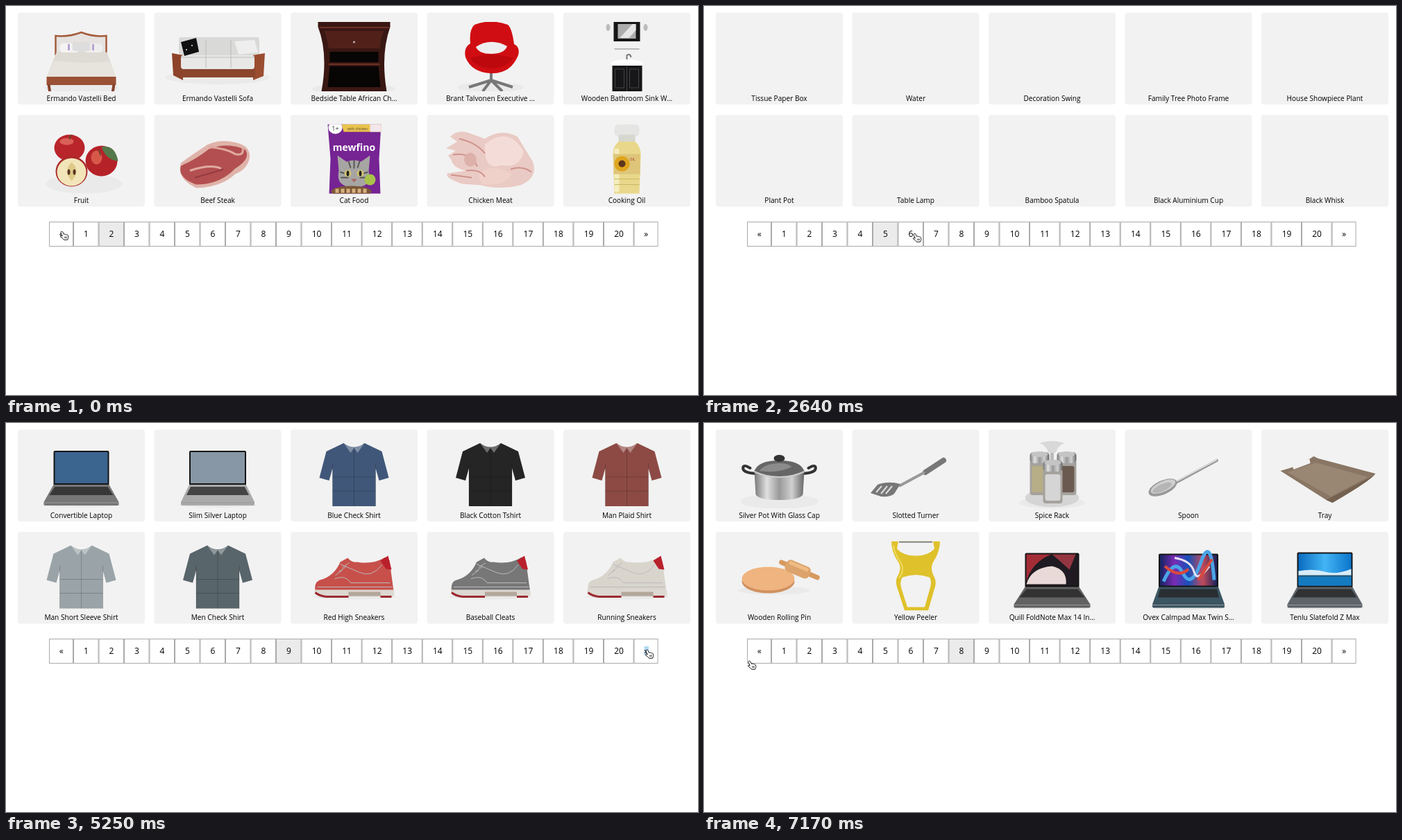
Animation of 997 by 561 pixels, one loop 7200 ms. Source, as an HTML page:

```html
<!DOCTYPE html>
<html lang="en">
<head>
<meta charset="utf-8">
<title>Product pages</title>
<style>
html, body { margin: 0; width: 100%; height: 100%; overflow: hidden; background: #fff; }
svg { display: block; }
text { font-family: "Open Sans", "Noto Sans", sans-serif; text-anchor: middle; }
.title { font-size: 10.1px; font-weight: 500; }
.nav { font-size: 12px; font-weight: 500; }
</style>
</head>
<body>
<svg id="stage" width="997" height="561" viewBox="0 0 997 561">
  <defs id="defs"></defs>
  <g id="cards"></g>
  <g id="items"></g>
  <g id="pager"></g>
  <path id="hand" fill="#fff" stroke="#111" d="M-4.6-5.4c1-.9 2-.4 2.5.6l1.6 3.2c.8-.7 1.7-.5 2.1.2.8-.5 1.6-.2 2 .5.9-.3 1.5.2 1.8 1 .6 1.8.6 3-.2 4.6L4.6 6.2H-.5C-1.7 4.3-3.5 3.2-5.3 2c-.8-.9 0-1.9 1.2-1.6l1.3.6-2-4.6c-.3-.7-.2-1.3.2-1.8zM1 1.5v2.5M3 1.5v2.5"/>
</svg>
<script>
const $ = id => document.getElementById(id);

// Shape helpers; pictures use x from the card centre and y from 0 to 100
const P = (d, fill, more = '') => `<path d="${d}" fill="${fill}" ${more}/>`;
const L = (d, color, w = 1, more = '') => P(d, 'none', `stroke="${color}" stroke-width="${w}" ${more}`);
const R = (x, y, w, h, fill, r = 0, more = '') => `<rect x="${x}" y="${y}" width="${w}" height="${h}" rx="${r}" fill="${fill}" ${more}/>`;
const E = (x, y, rx, ry, fill, more = '') => `<ellipse cx="${x}" cy="${y}" rx="${rx}" ry="${ry}" fill="${fill}" ${more}/>`;
const T = (x, y, size, fill, s, more = '') => `<text x="${x}" y="${y}" font-size="${size}" fill="${fill}" ${more}>${s}</text>`;
const turn = (a, x, y, s) => `<g transform="rotate(${a} ${x} ${y})">${s}</g>`;
const shadow = (x, y, rx, ry) => E(x, y, rx, ry, '#eaeaea');
const grad = (id, ...colors) => `<linearGradient id="${id}">` +
  colors.map((c, i) => `<stop offset="${i / (colors.length - 1)}" stop-color="${c}"/>`).join('') + '</linearGradient>';
const ROUND = 'stroke-linecap="round"';

$('defs').innerHTML = grad('steel', '#777', '#e0e0e0', '#999', '#d0d0d0', '#666') +
  grad('gold', '#8a6030', '#f0d5a0', '#b5884e', '#7a5028') +
  grad('frost', '#bdbdbd', '#eee', '#fafafa', '#ddd', '#b5b5b5') +
  grad('pearl', '#dcdcdc', '#f3f3f3', '#eaeaea', '#d4d4d4') +
  grad('amber', '#c9923e', '#f8dc9a', '#efbd68', '#fae7b8', '#c48a38') +
  grad('cloth', '#7c7f82', '#a0a2a4', '#939598', '#808284') +
  grad('sky', '#0a6cc0', '#43b5f5', '#0b75cc') +
  grad('neon', '#12235f', '#7a2bb5', '#1650b9', '#c04a5c', '#17225c');

// Strap with lugs, crown, case, dial, hour marks and two hands
function watch(x, r, strap, rim, dial, mark, more = '') {
  const w = r * .56, lug = r * .68;
  return P(`M${x - w + 2} 0H${x + w - 2}L${x + w} 50L${x + w - 2} 100H${x - w + 2}L${x - w} 50z`, strap) +
    L(`M${x} 0V100`, '#0003', 2 * w - 4, 'stroke-dasharray="1 4"') +
    L(`M${x - lug} ${50 - r}V${50 + r}M${x + lug} ${50 - r}V${50 + r}`, rim, 4, ROUND) +
    R(x + r - 2, 47, 5, 6, rim, 1) + E(x, 50, r, r, rim) + E(x, 50, r - 3, r - 3, dial, 'stroke="#0006"') +
    E(x, 50, r - 7, r - 7, 'none', `stroke="${mark}" stroke-width="4" pathLength="12" stroke-dasharray=".1 .9" stroke-dashoffset=".05"`) +
    more + L(`M${x} 50l${-r * .45} ${-r * .25}M${x} 50l${r * .6} ${-r * .3}`, mark, 1.2);
}
const subdial = (x, y, c) => E(x, y, 5, 5, 'none', `stroke="${c}"`);

function laptop(w, b, y, screen, deck, more = '') {
  return shadow(0, 95, b + 3, 4) + R(-w, y, 2 * w, 67 - y, '#151515', 2) + R(-w + 2, y + 2, 2 * w - 4, 62 - y, screen) +
    more + P(`M${-w} 66H${w}L${b} 91v3q0 2-3 2H${-b + 3}q-3 0-3-2v-3z`, deck) +
    P(`M${-w + 2} 69H${w - 2}L${b - 8} 81H${-b + 8}z`, '#222', 'opacity=".75"') + L(`M${-b} 92H${b}`, '#999');
}

const shoe = (c, more = '') => shadow(0, 80, 60, 4) +
  P('M-56 72C-57 62-55 57-46 55Q-28 49-20 30L-9 24Q-4 31 4 30Q28 34 45 23L51 28L57 72z', c) +
  L('M-20 33L8 45Q26 53 40 34M-28 54Q-12 48-5 60L52 60M-53 66H55M-17 38l10-7M-22 44l10-7M-27 49l10-7', '#bbb') +
  P('M38 28L49 21L54 41L46 40z', '#b9202c') + P('M-57 70H57l1 6q-1 4-5 4H-46q-10-2-11-7z', '#ddd8d2') +
  R(-8, 73, 46, 6, '#b3a69a') + L('M-56 74Q-50 79-40 80H-8M38 80H54', '#9c2a30', 3) + more;

const frontShoe = x => P(`M${x - 16} 27Q${x} 12 ${x + 16} 27L${x + 21} 84Q${x + 18} 95 ${x} 95T${x - 21} 84z`, '#e6e4e0') +
  P(`M${x - 15} 29Q${x} 8 ${x + 15} 29Q${x} 19 ${x - 15} 29`, '#c12a35') +
  L(`M${x - 9} 35h18M${x - 10} 42h20M${x - 10} 49h20M${x - 11} 56h22M${x - 17} 74Q${x} 56 ${x + 17} 74`, '#b5b2ae', 1.5) +
  L(`M${x - 20} 86Q${x - 16} 95 ${x} 95T${x + 20} 86`, '#a33', 2.5);

const shirt = c => P('M-15 6L-40 18L-50 56L-36 60L-31 42V97H31V42L36 60L50 56L40 18L15 6Q0 17-15 6z', c) +
  L('M0 13V97M-31 35V97M31 35V97M-31 55H31M-31 75H31', '#0003') + P('M-15 6L-5 20L0 13L5 20L15 6Q0 13-15 6', '#fff5');

const jar = (x, y, fill) => R(x - 14, y + 12, 28, 50, '#a5a29d', 4) + R(x - 11, y + 20, 22, 38, fill, 3) +
  R(x - 14, y, 28, 16, 'url(#steel)', 5) + E(x, y + 3, 12, 4, '#c4c4c4');

function palette() {
  const tones = ['#9b4a38', '#d8a173', '#5b2b27', '#c96b4c', '#7b322c', '#e1bd96'];
  let s = P('M-7 14L64 16L59 85L-9 63z', '#2a2727') + P('M-4 17L60 19L56 79L-6 60z', '#cfd4d4') +
    P('M15 18L40 18L5 61L-5 60z', '#eee') + P('M-56 84L-9 63L59 84L5 100H-10z', '#2a2020');
  for (let i = 0; i < 15; i++) {
    const a = i % 5, b = i / 5 | 0;
    s += E(-10 + a * 13 - b * 15, 69 + a * 4 + b * 6, 6, 3.2, tones[(i * 5 + b) % 6]);
  }
  return s;
}

const art = {
  1: [
    R(-29, 6, 17, 34, '#171b1a', 4) + R(-34, 37, 22, 65, '#14231e', 5) +
      T(-23, 60, 13, '#85cdb3', 'Lash', 'font-style="italic" transform="rotate(-12 -23 60)"') + R(-32, 74, 18, 15, '#75a894', 4) +
      T(-23, 84, 5, '#123', 'VOLUME') + L('M22 0V18', '#222', 7, 'stroke-dasharray="1.4 .8"') + L('M22 18V70', '#222', 2) +
      P('M16 68h12l5 32H11z', '#111') + L('M22 82l5 6-5 6-5-6z', '#9fd5bd', 2),
    palette(),
    shadow(1, 88, 42, 10) + E(-1, 43, 33, 23, '#292929') + E(-1, 42, 28, 18, '#5b5652') + E(-1, 44, 25, 15, '#413c3a') +
      R(-11, 61, 22, 9, '#333', 2) + E(1, 79, 36, 15, '#222') + E(1, 75, 35, 12, '#555') + E(1, 75, 29, 9, '#d9c3b4'),
    P('M-32 100V62Q-30 43-18 43T-4 62V100z', '#202020') + L('M-25 62V98', '#555', 4) +
      P('M10 25V0H25L27 25z', '#cf1726') + R(7, 23, 23, 43, 'url(#gold)') + R(4, 65, 28, 35, '#1c1919', 2) + L('M10 68V98', '#555', 3),
    shadow(0, 93, 46, 8) + turn(-25, 18, 73, R(2, 49, 30, 32, '#c9172a', 8) + R(6, 73, 22, 33, '#302e2f', 4)) +
      P('M-27 48L-24 8H-11L-8 48z', '#282628') + R(-34, 50, 34, 45, '#b91528', 7) + R(-30, 53, 6, 37, '#e66a72', 3) + R(-27, 47, 19, 7, '#8b1120'),
    R(-77, 0, 40, 100, '#000') + R(37, 0, 40, 100, '#000') + R(-20, 0, 40, 7, '#d8d8d8') +
      P('M-27 0H27Q32 12 32 24V100H-31V24Q-32 12-27 0z', 'url(#frost)') + T(0, 57, 38, '#888', 'ov', 'font-weight="300"') + T(0, 66, 5, '#999', 'duo'),
    R(-14, 0, 28, 13, '#151515', 2) + R(-11, 12, 22, 8, '#333') + R(-40, 19, 81, 82, '#090909', 5) +
      R(-18, 38, 37, 43, '#111', 0, 'stroke="#b89b68" stroke-width="1.5"') + T(0, 51, 8, '#eee', 'LUNE') + T(0, 58, 5, '#ddd', 'NUIT') +
      T(0, 69, 7, '#eee', 'VARELLE', 'font-weight="700"') + T(0, 76, 4, '#ddd', 'PARIS'),
    P('M-5 0H5L7 25Q9 43 19 57Q26 75 23 100H-24Q-26 73-18 57Q-8 42-6 25z', 'url(#amber)') +
      L('M-6 9H6M-6 15H6M-6 21H6M-7 28H7M-8 34H8', '#a56c28', 1.5) + L('M-15 64Q0 53 15 64', '#fff6', 5),
    R(-78, 0, 14, 100, '#000') + R(63, 0, 14, 100, '#000') + P('M-24 3Q0-5 23 3L13 14V23H-13V14z', '#e7bd2b') +
      P('M-22 37Q-30 40-29 52L-26 95Q0 107 26 95L29 52Q30 40 22 37z', '#f1e995') + R(-22, 42, 43, 47, '#f7f2b9', 9) +
      P('M-22 24L0 29L21 22V35L3 31L6 41L0 33L-9 41L-5 31L-20 34z', '#161616') + T(0, 68, 15, '#555', 'Solea', 'font-style="italic"') +
      T(0, 75, 4, '#777', 'EAU DE PARFUM') + T(0, 87, 5, '#777', 'glint'),
    R(-15, 0, 30, 15, '#e4b9ab') + R(-38, 13, 76, 88, '#efc9bd', 2) + R(-34, 18, 68, 83, '#f2d5ca') +
      R(-29, 32, 58, 76, '#f1e4dc', 0, 'stroke="#111" stroke-width="4"') + T(0, 67, 9, '#333', 'VENRO', 'letter-spacing="1"') + T(0, 73, 5, '#555', 'PETAL'),
  ],
  2: [
    shadow(0, 95, 54, 7) + P('M-37 45V20Q-18 21 0 14Q18 21 36 20V45z', '#e5e2df') + L('M-37 48V20Q-19 22 0 15Q18 22 36 20V48', '#a45d3d', 2.5) +
      P('M-36 44Q0 36 37 44L50 80H-50z', '#dedbd4') + P('M-39 56Q0 61 42 57L50 80H-50z', '#e7e4dd') +
      R(-31, 31, 28, 13, '#f4f3f3', 5) + R(3, 31, 28, 13, '#eee', 5) + R(-13, 29, 26, 13, '#ddd', 4) + L('M-18 32v9M17 32v9', '#b8a3cf', 3) +
      P('M-50 79H50V91H-50z', '#9a5135') + L('M-47 90l2 13M47 90l-2 13', '#87422b', 4),
    shadow(0, 80, 75, 10) + R(-56, 22, 116, 42, '#d9d9d8', 4) + P('M-66 45L-50 48V84L-64 77z', '#8d432a') + P('M68 45L51 48V84L66 78z', '#9b4d30') +
      R(-52, 68, 106, 12, '#8b452d') + R(-53, 48, 106, 20, '#e8e8e7', 4) + L('M-17 26V66M19 26V66M-53 51H53', '#bbb') +
      P('M-53 29L-31 23L-27 43L-48 49z', '#111') + E(-37, 34, 1, 1, '#eee') + E(-45, 40, 1, 1, '#eee') + P('M24 28L53 26L58 44L30 47z', '#eee'),
    shadow(0, 97, 60, 9) + P('M-52 0H52V7Q38 47 47 100H-47Q-37 46-52 7z', '#391713') + P('M-43 13H43Q38 25 37 38H-37Q-38 25-43 13z', '#512119') +
      P('M-35 43H35V58H-35zM-35 64H35L38 94H-38z', '#080505') + L('M-50 8H50M-37 61H37', '#6e3026', 2) + E(0, 29, 1.5, 1.5, '#bbb'),
    shadow(0, 94, 48, 7) + L('M1 70V85M1 84L-31 94M1 84L-11 100M1 84L32 94M1 84L17 100', '#777', 4) +
      P('M-23 4Q0-5 25 4Q31 9 34 32Q43 36 40 48Q29 75 1 74Q-27 73-36 51Q-39 37-29 31Q-31 11-23 4z', '#d00d12') +
      P('M-21 36Q0 22 24 35Q20 46 1 46Q-17 46-21 36z', '#eee') + P('M-29 52Q0 42 33 52Q20 68 1 67Q-20 67-29 52z', '#bd090e'),
    R(-19, 0, 38, 28, '#171717') + R(-13, 3, 26, 21, '#adadad') + P('M-10 23L8 3H13V12L3 23z', '#e5e5e5') +
      E(-27, 8, 3, 5, '#bbb') + E(27, 8, 3, 5, '#bbb') + L('M-18 39H18', '#bbb', 2) + L('M0 57V48Q5 45 6 51', '#777', 2) +
      E(0, 60, 23, 6, '#fff') + R(-21, 63, 43, 37, '#171719') + L('M0 65V100M-17 68H-4V95H-17zM4 68H17V95H4z', '#444'),
    shadow(4, 86, 55, 14) + E(-17, 34, 22, 19, '#b9252b') + E(-21, 25, 10, 5, '#db6057') + E(29, 53, 23, 22, '#b52228') + E(22, 48, 8, 10, '#d75849') +
      P('M29 33Q48 28 53 53Q36 52 29 33', '#55784a') + L('M-17 22Q-17 16-13 16M28 45L25 37', '#69452c', 2) +
      E(-14, 68, 23, 22, '#a92a2a') + E(-14, 69, 21, 20, '#f2e5b9') + P('M-14 55Q0 66-14 82Q-27 67-14 55', '#dfc989') + E(-18, 69, 2, 4, '#59341e') + E(-10, 69, 2, 4, '#59341e'),
    P('M-53 56Q-40 46-20 33Q-5 22 19 25Q48 29 46 48Q43 65 25 72Q5 91-31 92Q-60 78-53 56z', '#dfb3a9') +
      P('M-53 60Q-30 50-13 36Q15 25 40 37Q48 50 25 64Q3 87-31 87Q-58 77-53 60z', '#b34f50') +
      L('M-13 33Q13 35 25 43Q38 46 36 35M-40 67Q-10 57 5 64', '#e0aaa0', 3) + L('M-33 77Q-8 70 8 65', '#943a42', 2),
    P('M-38 0H39L36 50L38 101H-36L-34 50z', '#762394') + P('M-18 0H39V11H-15z', '#e9c34d') + R(23, 0, 16, 11, '#f3e6ed') + E(-27, 5, 10, 9, '#fff') +
      T(-27, 9, 9, '#333', '1+') + T(5, 8, 5, '#543', 'with chicken') + T(0, 38, 14, '#fff', 'mewfino', 'font-weight="700"') +
      P('M-22 67L-24 45L-11 54Q0 50 10 54L23 45L21 68Q27 91 0 91Q-27 91-22 67z', '#a6a5a3') +
      L('M-8 53l3 10M0 52v12M8 53l-3 10M-20 69l10 3M20 69l-10 3M-19 77l11 0M19 77l-11 0', '#565656', 2) +
      E(-9, 71, 5, 5, '#d4c570') + E(9, 71, 5, 5, '#d4c570') + E(-9, 71, 2, 4, '#222') + E(9, 71, 2, 4, '#222') + P('M-4 79h8l-4 5z', '#a96762') +
      E(23, 80, 8, 8, '#a9c24a') + E(-4, 97, 29, 8, '#795637') + L('M-27 96H20', '#d7b07e', 6, 'stroke-dasharray="5 3"'),
    P('M-58 18Q-48 8-33 12L-8 21Q15 5 39 18Q50 36 61 54Q69 77 43 88Q13 95-13 88L-41 86Q-67 77-62 71L-35 67Q-54 63-56 52L-61 45L-50 38L-64 35L-48 25z', '#eacac4') +
      P('M-8 29Q25 2 48 39Q42 65 15 59Q-10 68-8 29z', '#f4ddd8') + P('M-17 73Q2 54 30 72Q20 91-13 86z', '#f0d1c9') +
      L('M-45 21Q-21 26-8 42M-54 44Q-28 40-19 61M-35 67Q-15 64-8 76M29 65Q46 59 59 69M-57 73L-27 77', '#cf938d', 2) + E(-29, 51, 9, 10, '#ddb1aa'),
    R(-18, 0, 36, 18, '#e5e5e4', 7) + R(-12, 15, 24, 13, '#d6d7cf', 3) + P('M-12 25H12Q21 33 20 47L18 101H-18L-20 47Q-21 33-12 25z', '#e9d88b') +
      R(-18, 35, 7, 63, '#f5edbc', 3) + R(-19, 43, 38, 29, '#dec579') + E(-7, 57, 11, 11, '#dfa51d') + E(-7, 57, 5, 5, '#5c371b') +
      T(8, 52, 5, '#a33', 'OIL') + L('M-18 79H18M-18 87H18', '#c9b85f'),
  ],
  8: [
    shadow(0, 90, 56, 11) + L('M-34 50L-42 49Q-54 47-52 40Q-50 37-42 42M34 50L42 49Q54 47 52 40Q50 37 42 42', '#333', 4, ROUND) +
      P('M-36 46H36L34 80Q30 88 0 88Q-30 88-34 80z', 'url(#steel)') +
      P('M-36 46Q-30 31 0 31Q30 31 36 46Q20 54 0 54T-36 46z', '#666') + P('M-29 46Q-20 35 0 35Q12 35 18 40Q0 50-29 46z', '#8b8b8b') +
      E(0, 28, 8, 5, '#333') + L('M-36 47Q-20 55 0 55T36 47', '#ccc', 2),
    L('M40 31L14 48', '#777', 8, ROUND) + L('M13 48L-24 68', '#999', 4) +
      P('M-65 78L-55 66Q-40 60-22 65L-31 79Q-36 84-50 83z', '#777') + L('M-57 77l8-9M-50 79l9-11M-43 79l9-11', '#ddd', 2),
    shadow(0, 92, 48, 8) + E(0, 85, 39, 13, '#d5d5d5') + L('M0 10V85', '#bbb', 5) + P('M-18 6Q0 0 18 6Q9 9 5 20H-5Q-9 9-18 6z', '#d8d8d8') +
      jar(-18, 19, '#b7ad86') + jar(21, 19, '#6b5a50') + jar(1, 31, '#d5d5d5'),
    L('M41 31L-20 64', '#999', 4, ROUND) + L('M41 30L-19 62', '#ddd', 1.5) +
      turn(-24, -37, 70, E(-37, 70, 22, 10, '#999') + E(-36, 69, 19, 7.5, '#cfcfcf') + E(-38, 70, 15, 5, '#b5b5b5')),
    P('M-64 46Q-36 39-16 25L-10 28L73 50Q66 60 11 92L2 88z', '#8a7664') + P('M-54 48L-13 34L62 55L9 83z', '#9a8773') +
      P('M2 88L70 53L73 50Q66 60 11 92z', '#75614f') + P('M-47 39L-22 29L-21 35L-45 44z', '#f2f2f2'),
    shadow(-8, 71, 52, 6) + E(-16, 58, 38, 17, '#d09160') + E(-16, 54, 38, 17, '#efb47f') +
      turn(23, 28, 41, L('M1 41H57', '#d79a60', 7, ROUND) + R(8, 32, 37, 18, '#dca46c', 6) + R(11, 34, 30, 5, '#efbc86', 2)),
    P('M-35 0H35Q35 14 27 27Q19 38 27 52Q31 60 26 72L18 100H-16L-25 72Q-30 60-27 52Q-18 38-27 27Q-35 14-35 0z', '#dfc12b') +
      P('M-25 0H25L27 11Q18 21 0 21T-27 11zM-19 52Q0 45 20 52Q24 58 20 70L13 95H-12L-20 70Q-24 58-19 52z', '#f2f2f2') + R(-24, 0, 48, 2, '#777') +
      L('M-32 6Q-31 16-24 27Q-14 40-24 53', '#efd95c', 2),
    laptop(39, 55, 17, '#201b22', '#626262', P('M-37 62Q-30 38 0 36Q22 41 20 62z', '#e9dad8') + P('M-37 19H-1Q-29 30-37 58z', '#a32c36') + P('M0 19H34L25 41Q12 29 0 19z', '#943641')),
    laptop(43, 52, 18, 'url(#neon)', '#3c5563', L('M-36 58Q-20 22-8 46T18 30T37 56', '#4aa5e8', 5) + L('M-20 24Q4 28 8 44T30 36', '#e5e0f2', 3) + L('M-34 36Q-14 54 0 40M14 56L34 26', '#d9493c', 4)),
    laptop(40, 54, 16, 'url(#sky)', '#5d646a', P('M-38 43Q-16 39 0 44T38 40V50H-38z', '#d8edf9') + P('M-38 50H38V64H-38z', '#147bc1') + L('M-38 50H38', '#27516d', 2)),
  ],
  9: [
    laptop(40, 54, 17, '#3b648f', '#777'), laptop(41, 53, 17, '#8797a5', '#aaa'), shirt('#405779'), shirt('#252525'), shirt('#8d4a44'),
    shirt('#9aa4a8'), shirt('#58656b'), shoe('#c7504b'), shoe('#777'), shoe('#d9d5cd'),
  ],
  10: [
    shoe('#e7e6e2', E(8, 55, 11, 11, '#bd2029')),
    shadow(0, 93, 50, 8) + frontShoe(-22) + frontShoe(25),
    watch(3, 27, '#5d4035', '#c0974f', '#e8e6e0', '#444', subdial(-8, 50, '#777') + subdial(3, 39, '#777') + subdial(14, 50, '#777') + E(3, 62, 6, 5, '#324f87')),
    watch(-1, 28, 'url(#steel)', '#999', '#202225', '#ccc', subdial(-11, 50, '#999') + subdial(-1, 38, '#999') + subdial(-1, 62, '#999')),
    watch(2, 32, '#262626', '#a8765f', '#2c2a29', '#a58777', E(12, 50, 8, 8, '#151515', 'stroke="#777"')),
    watch(0, 32, '#30231f', '#a87f6e', '#e6e6e6', '#86736b', E(-3, 66, 8, 8, '#263e98') + E(-6, 67, 3, 3, '#7185bb')),
    watch(0, 28, 'url(#steel)', 'url(#gold)', '#4b443e', '#c1a779', R(8, 46, 7, 7, '#ddd') + L('M0 0V22M0 78V100', '#b58a48', 11, 'stroke-dasharray="4 1"')),
    watch(-1, 33, 'url(#steel)', '#292a2c', '#121315', '#ddd', E(-1, 50, 30, 30, 'none', 'stroke="#777" stroke-width="2" stroke-dasharray="1 4"') + R(8, 46, 9, 7, '#eee') + L('M-1 0V17M-1 83V100', '#b48a48', 13, 'stroke-dasharray="4 1"')),
    shadow(0, 97, 50, 6) + P('M-37 4Q0-4 37 4L34 101H-37z', 'url(#cloth)') + E(0, 5, 37, 5, '#202426') + L('M-35 6Q0 13 35 6', '#5fa5d6', 2),
    shadow(4, 94, 54, 7) + E(-16, 25, 29, 25, '#dadada', 'transform="rotate(32 -16 25)"') + E(19, 24, 29, 24, '#dedede', 'transform="rotate(-32 19 24)"') +
      R(-46, 46, 93, 55, 'url(#pearl)', 15) + E(0, 51, 41, 5, '#cfcfcf') + P('M-14 34L-3 50H-13L-27 39zM17 34L7 50H17L30 39z', '#e6e6e6') +
      E(-17, 33, 15, 12, '#f5f5f5') + E(20, 33, 15, 12, '#f5f5f5') + turn(30, -17, 34, E(-17, 34, 6, 4, '#444')) + turn(-30, 18, 34, E(18, 34, 6, 4, '#444')) + E(0, 65, 1, 1, '#da6'),
  ],
};

const titles = [,
  "Lustera Mascara Lash Pri…|Eyeshadow Palette with M…|Powder Canister|Red Lipstick|Red Nail Polish|Orvin Vessel OV Duo|Varelle Lune Nuit Eau De|Faen T'espère|Solea Glint Eau de|Venro Petal Eau de",
  'Ermando Vastelli Bed|Ermando Vastelli Sofa|Bedside Table African Ch…|Brant Talvonen Executive …|Wooden Bathroom Sink W…|Fruit|Beef Steak|Cat Food|Chicken Meat|Cooking Oil',
  'Cucumber|Dog Food|Eggs|Fish Steak|Green Bell Pepper|Green Chili Pepper|Honey Jar|Ice Cream|Juice|Kiwi',
  'Lemon|Milk|Mulberry|Instant Coffee|Potatoes|Protein Powder|Red Onions|Rice|Soft Drinks|Strawberry',
  'Tissue Paper Box|Water|Decoration Swing|Family Tree Photo Frame|House Showpiece Plant|Plant Pot|Table Lamp|Bamboo Spatula|Black Aluminium Cup|Black Whisk',
  'Boxed Blender|Carbon Steel Wok|Chopping Board|Citrus Squeezer Yellow|Egg Slicer|Electric Stove|Fine Mesh Strainer|Fork|Glass|Grater Black',
  'Hand Blender|Ice Cube Tray|Kitchen Sieve|Knife|Lunch Box|Microwave Oven|Mug Tree Stand|Pan|Plate|Red Tongs',
  'Silver Pot With Glass Cap|Slotted Turner|Spice Rack|Spoon|Tray|Wooden Rolling Pin|Yellow Peeler|Quill FoldNote Max 14 In…|Ovex Calmpad Max Twin S…|Tenlu Slatefold Z Max',
  'Convertible Laptop|Slim Silver Laptop|Blue Check Shirt|Black Cotton Tshirt|Man Plaid Shirt|Man Short Sleeve Shirt|Men Check Shirt|Red High Sneakers|Baseball Cleats|Running Sneakers',
  'Sports Sneakers Pale Grey…|Sports Sneakers Pale Grey…|Brown Leather Belt Watch|Corvanne Prime Collection|Velmo Tarsino Date Black D…|Velmo Tarsino Moonphase|Velmo Dayfine|Velmo Tidehunter Watch|Nilora Murmur Max|Quill Earbeads',
].map(s => s.split('|'));

// time, highlighted page, listed page, time the pictures start to arrive
const NONE = Infinity;
const states = [
  [0, 2, 2, -999], [120, 1, 2, -999], [240, 1, 1, 360],
  [1080, 2, 1, 360], [1170, 2, 2, 1230], [1590, 3, 2, 1230], [1680, 3, 3, NONE],
  [2100, 4, 3, NONE], [2190, 4, 4, NONE], [2460, 5, 4, NONE], [2550, 5, 5, NONE],
  [2760, 6, 5, NONE], [2850, 6, 6, NONE], [3120, 7, 6, NONE], [3210, 7, 7, NONE],
  [3480, 8, 7, NONE], [3570, 8, 8, NONE], [4170, 9, 8, NONE], [4260, 9, 9, 4530],
  [5310, 10, 9, 4530], [5400, 10, 10, 5490], [6600, 9, 10, 5490], [6660, 9, 9, NONE],
  [6810, 8, 9, NONE], [6870, 8, 8, 6900],
];
// time, x, y of the pointer
const moves = [
  [0, 84, 331], [840, 84, 331], [1050, 155, 331], [1350, 155, 331], [1560, 198, 331], [1860, 198, 331],
  [2070, 232, 332], [2280, 232, 332], [2430, 268, 333], [2640, 307, 334], [2820, 307, 334], [3060, 340, 333],
  [3240, 340, 333], [3420, 376, 333], [3660, 376, 333], [4080, 927, 333], [5845, 927, 333], [6400, 88, 331],
  [6500, 74, 365], [6600, 82, 333], [6840, 82, 333], [7140, 69, 349], [7200, 69, 349],
];

const place = i => [17 + i % 5 * 196.5, i < 5 ? 9.5 : 157];
$('cards').innerHTML = titles[1].map((_, i) => R(...place(i), 183, 132.5, '#f2f2f2', 4)).join('');

function drawItems(page, count) {
  $('items').innerHTML = titles[page].map((name, i) => {
    const [x, y] = place(i);
    const picture = i < count && art[page] ? `<svg x="${x}" y="${y + 13.5}" width="183" height="100" viewBox="-91.5 0 183 100">${art[page][i]}</svg>` : '';
    return picture + `<text class="title" x="${x + 91.5}" y="${y + 127.3}">${name}</text>`;
  }).join('');
}

function drawPager(active, selected) {
  let x = 62, s = '';
  for (let i = 0; i < 22; i++) {
    const w = i % 21 ? (i < 10 ? 36.5 : 43.55) : 35;
    const label = i ? i < 21 ? i : '»' : '«';
    if (i || active > 1) {
      s += R(x + .5, 311.5, w - 1, 35, i == active ? '#ebebeb' : '#fff', 0, 'stroke="#aaa"');
      if (i == 21 && selected) s += R(919.5, 322, 6.5, 13, '#b3d9f2');
      s += `<text class="nav" x="${x + w / 2 + .3}" y="333.2">${label}</text>`;
    }
    x += w;
  }
  $('pager').innerHTML = s;
}

let itemKey, pagerKey;
function frame() {
  const t = performance.now() % 7200;
  const [, active, page, load] = states.findLast(s => s[0] <= t);
  const count = Math.max(0, Math.min(10, Math.floor((t - load) / 20)));
  const selected = t >= 4140 && t < 5310;
  if (itemKey != (itemKey = page + '/' + count)) drawItems(page, count);
  if (pagerKey != (pagerKey = active + '/' + selected)) drawPager(active, selected);

  const k = moves.findLastIndex(m => m[0] <= t), [t0, x0, y0] = moves[k], [t1, x1, y1] = moves[k + 1];
  const u = (t - t0) / (t1 - t0), e = u * u * (3 - 2 * u);
  $('hand').setAttribute('transform', `translate(${x0 + (x1 - x0) * e} ${y0 + (y1 - y0) * e})`);
  requestAnimationFrame(frame);
}
frame();
</script>
</body>
</html>
```
